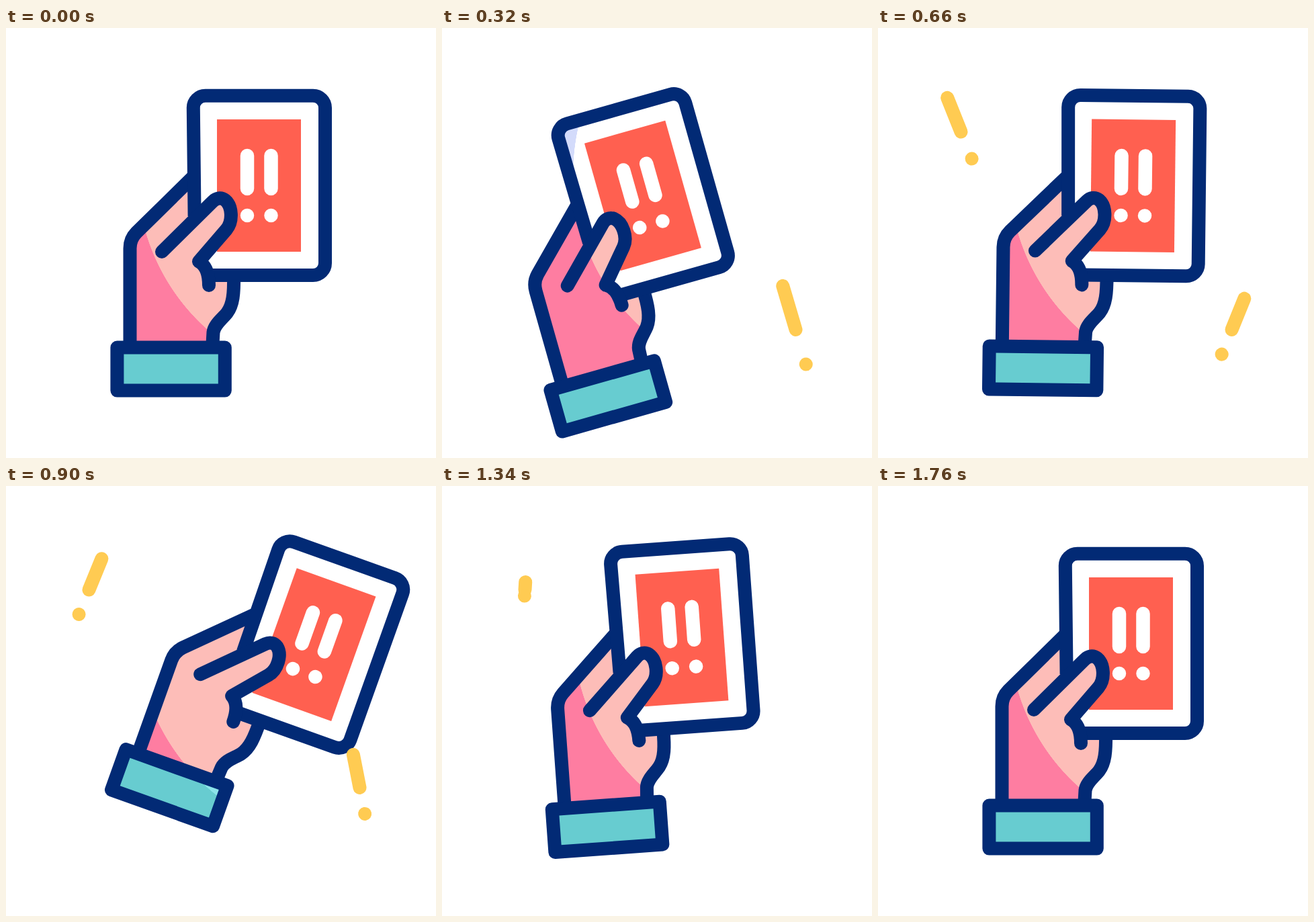
Write an HTML page that moves like this. It is 640 px wide and 640 px high and loops after 2.4 s.

```html
<!DOCTYPE html>
<html lang="en">
<head>
<meta charset="utf-8">
<title>Warning card</title>
<style>
  html, body { margin: 0; width: 100%; height: 100%; overflow: hidden; background: #fff; }
  svg { display: block; width: 100%; height: 100%; }
  .ink { fill: none; stroke: #022a75; stroke-width: 20; stroke-linejoin: round; }
  .round { stroke-linecap: round; }
  .bars { fill: none; stroke: #fff; stroke-width: 20.5; stroke-linecap: round; }
  .mark { stroke: #ffcb52; stroke-width: 20; stroke-linecap: round; }
</style>
</head>
<body>
<svg id="stage" viewBox="0 0 640 640"></svg>
<script>
const LOOP = 2400;
const STEP = 20;
const PIVOT = { x: 243.5, y: 501 };
const GLOW = { x: 507, y: 216, r: 312 };

// Each fill is light inside the fixed glow circle and shaded outside it
const fills = {
  skin: ['#fdbdb8', '#fe7da1'],
  card: ['#ffffff', '#d3dbfb'],
  panel: ['#ff6050', '#f2473f'],
  cuff: ['#8ce4e9', '#67ccd0']
};

const gradients = Object.entries(fills).map(([id, [light, shade]]) => `
  <radialGradient id="${id}" gradientUnits="userSpaceOnUse" r="${GLOW.r}">
    <stop offset=".9985" stop-color="${light}"/><stop offset="1" stop-color="${shade}"/>
  </radialGradient>`).join('');

const arm = 'M277 223 L194 304.5 Q184.5 314 184.5 328 V472';
const cardEdge = 'M280.6 280 L278.8 119 A18 18 0 0 1 297 100.7 H457 A18 18 0 0 1 475 118.7 V350 A18 18 0 0 1 457 368 H302';
const finger = 'M232 333 L308 258 C313 253 320 251.5 326 256 C337 265 338 288 328 300 L287 347.5';
const mark = '<g class="mark"><line/><line/></g>';

const stage = document.getElementById('stage');
stage.innerHTML = `
  <defs>${gradients}</defs>
  <g id="hand">
    <path fill="url(#skin)" d="${arm} H307.5 V470 L308.5 453 C310 441 322 433 329 424 C338 412 339.5 395 339 366 H290 Z"/>
    <path class="ink" d="${arm}"/>
    <path class="ink" d="M339 368 C339.5 395 338 412 329 424 C322 433 310 441 308.5 453 L307.5 470"/>
    <path fill="url(#card)" d="${cardEdge} Q300 354 288 347 Z"/>
    <rect fill="url(#panel)" x="314" y="136" width="125" height="197"/>
    <path class="bars" d="M359 190 V239 M394.5 190 V239 M359 279 h0 M394.5 279 h0"/>
    <path class="ink" d="${cardEdge}"/>
    <path fill="url(#skin)" d="${finger} Z"/>
    <path class="ink round" d="${finger} C297 353 302 366 302 383"/>
    <rect class="ink" style="fill:url(#cuff)" x="165.4" y="475.6" width="160.4" height="64"/>
  </g>
  ${mark}${mark}`;

const hand = document.getElementById('hand');
const glows = stage.querySelectorAll('radialGradient');
const marks = [...stage.querySelectorAll('.mark')].map((el, i) => ({
  el,
  stem: el.children[0],
  dot: el.children[1],
  ...[{ x: 526.5, y: 449, delay: 0 }, { x: 123.5, y: 154.5, delay: 230 }][i]
}));

const smooth = u => (1 - Math.cos(Math.PI * u)) / 2;
const settle = u => smooth(1 - (1 - u) ** 2);

// Steps: [time, value, easing towards this step]
const tilt = [[0, 0], [490, -21.6], [828, 22.5], [1213, -11.25], [1495, 5.6], [1760, 0]];
const lift = [[125, 0], [435, 59], [880, -59.5], [1420, 0, settle]];
const wag = [[150, 0], [410, -22.5], [670, 22.2], [890, -11.25], [1055, 6], [1180, 0]];
const reach = [[150, 0], [312, 68], [490, 50], [890, 50], [1050, 69], [1132, 0]];

function track(steps, t) {
  const i = steps.findIndex(s => s[0] > t);
  if (i === 0) return steps[0][1];
  if (i < 0) return steps[steps.length - 1][1];
  const [t0, v0] = steps[i - 1];
  const [t1, v1, ease = smooth] = steps[i];
  return v0 + (v1 - v0) * ease((t - t0) / (t1 - t0));
}

function drawHand(time) {
  const angle = track(tilt, time);
  const rise = track(lift, time);
  hand.setAttribute('transform', `translate(0 ${rise}) rotate(${angle} ${PIVOT.x} ${PIVOT.y})`);

  // Undo the pose for the glow centre, so the light stays put on the stage
  const a = angle * Math.PI / 180;
  const dx = GLOW.x - PIVOT.x;
  const dy = GLOW.y - rise - PIVOT.y;
  glows.forEach(g => {
    g.setAttribute('cx', PIVOT.x + dx * Math.cos(a) + dy * Math.sin(a));
    g.setAttribute('cy', PIVOT.y - dx * Math.sin(a) + dy * Math.cos(a));
  });
}

function drawMark(m, time) {
  const t = time - m.delay;
  const length = track(reach, t);
  m.el.style.display = length > 0 ? '' : 'none';
  m.el.setAttribute('transform', `translate(${m.x} ${m.y}) rotate(${track(wag, t)})`);
  m.stem.setAttribute('y1', -length);
  m.dot.setAttribute('y1', length * 0.79);
  m.dot.setAttribute('y2', length * 0.79);
}

const start = performance.now();
function tick() {
  const elapsed = (performance.now() - start) % LOOP;
  const time = Math.floor(elapsed / STEP) * STEP;
  drawHand(time);
  marks.forEach(m => drawMark(m, time));
  requestAnimationFrame(tick);
}
tick();
</script>
</body>
</html>
```
